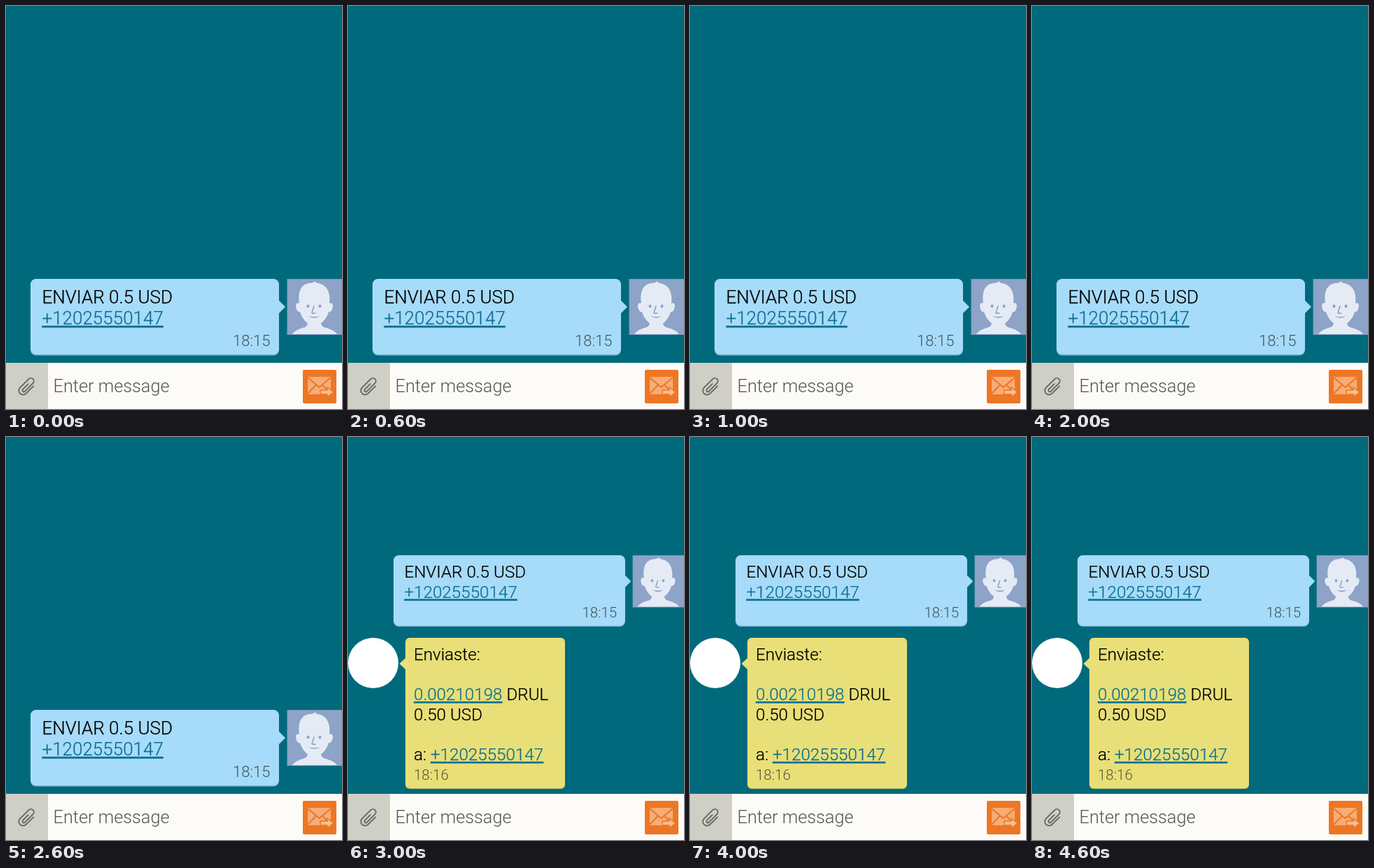
Recreate the animation shown at these times as an HTML page. Size 480 px wide and 576 px high, loop 5 s.

```html
<!DOCTYPE html>
<html lang="es">
<head>
<meta charset="utf-8">
<title>SMS payment</title>
<style>
  html, body { margin: 0; width: 100%; height: 100%; overflow: hidden; background: #006a7c; }
  svg { display: block; width: 100%; height: 100%; }
  text { font: 300 26px Roboto, sans-serif; fill: #000; stroke: #000; stroke-width: .25px; white-space: pre; }
  .link {
    fill: #0a7090; stroke: #0a7090;
    text-decoration: underline; text-decoration-thickness: 1.3px; text-underline-offset: 1.5px;
  }
  .time { font-size: 22px; fill: #40555f; stroke: none; }
  .hint { font-size: 25.3px; fill: #555; stroke: none; }
  .reply text { font-size: 24.2px; }
  .reply .time { font-size: 20.5px; fill: #57563a; }
  .sent { transform-origin: 0 0; animation: lift 5s step-end infinite; }
  .reply { animation: show 5s step-end infinite; }
  @keyframes lift {
    0% { transform: none; }
    60%, 100% { transform: translate(32.4px, -194.5px) scale(.932); }
  }
  @keyframes show {
    0% { visibility: hidden; }
    60%, 100% { visibility: visible; }
  }
</style>
</head>
<body>
<svg viewBox="0 0 480 576">
  <rect width="480" height="576" fill="#006a7c"/>

  <g class="sent">
    <rect x="35" y="391" width="355" height="108.5" rx="8" fill="#79b4d2"/>
    <path d="M43 390H382a8 8 0 0 1 8 8V421L399 430L390 439V490a8 8 0 0 1-8 8H43a8 8 0 0 1-8-8V398a8 8 0 0 1 8-8Z" fill="#a6dbf9"/>
    <text x="51.5" y="424.5">ENVIAR 0.5 USD</text>
    <text x="51.5" y="455" class="link">+12025550147</text>
    <text x="377.5" y="485.5" class="time" text-anchor="end">18:15</text>

    <!-- avatar -->
    <rect x="401.5" y="390" width="80" height="80" fill="#7f94b8"/>
    <rect x="402" y="391" width="79" height="78.500" fill="#8da3c8"/>
    <g fill="#e5ebf5">
      <path d="M409 469C413 463 421 461 427 459C431 457 431 454 431 449H450C450 454 450 457 454 459C460 461 469 463 473 469Z"/>
      <path d="M419 425C417 410 420 397 435 396C438 396 440 395 442 393C442 395 443 396 445 396C458 398 464 409 462 425C467 423 468 429 466 433C465 436 463 438 461 437C458 448 450 456 440.500 456C431 456 423 448 420 437C418 438 416 436 415 433C413 429 414 423 419 425Z"/>
    </g>
    <g fill="#8da3c8">
      <ellipse cx="431.500" cy="429" rx="2" ry="2.300"/>
      <ellipse cx="448.500" cy="429" rx="2" ry="2.300"/>
      <path d="M432 443q8 2.500 16 0q-7 6-16 0Z"/>
    </g>
    <path d="M440 429L437 438.500q2 1.500 5 .5" fill="none" stroke="#8da3c8" stroke-width="1.600" stroke-linecap="round"/>
  </g>

  <g class="reply">
    <circle cx="36" cy="323" r="36" fill="#fff"/>
    <rect x="82" y="288" width="228" height="215" rx="6" fill="#b8b45f"/>
    <path d="M88 287H304a6 6 0 0 1 6 6V496a6 6 0 0 1-6 6H88a6 6 0 0 1-6-6V332L73.500 324L82 316V293a6 6 0 0 1 6-6Z" fill="#e8df78"/>
    <text x="94" y="319">Enviaste:</text>
    <text x="94" y="376"><tspan class="link">0.00210198</tspan> DRUL</text>
    <text x="94" y="405">0.50 USD</text>
    <text x="94" y="462">a: <tspan class="link">+12025550147</tspan></text>
    <text x="94" y="490" class="time">18:16</text>
  </g>

  <!-- input bar -->
  <rect y="510" width="480" height="66" fill="#fdfbf8"/>
  <rect y="510" width="60" height="66" fill="#d0cfc5"/>
  <path transform="translate(30 544) rotate(45)" d="M6-7V8A6 6 0 0 1-6 8V-9.500A4.300 4.300 0 0 1 2.600-9.500V7A2 2 0 0 1-1.400 7V-4"
        fill="none" stroke="#5d6662" stroke-width="1.800" stroke-linecap="round"/>
  <text x="67.500" y="551.500" class="hint">Enter message</text>

  <!-- send button -->
  <rect x="424" y="520" width="48" height="48" rx="2" fill="#ee7623"/>
  <rect x="431" y="530" width="33" height="25" fill="#f6ad78"/>
  <path d="M431 531L447.500 545L464 531M431 554L443 541.500M464 554L452 541.500" fill="none" stroke="#ee7623" stroke-width="2"/>
  <path d="M449 549H459V545L468 552L459 559V555H449Z" fill="#f8bd92" stroke="#ee7623" stroke-width="1.500"/>
</svg>
</body>
</html>
```
